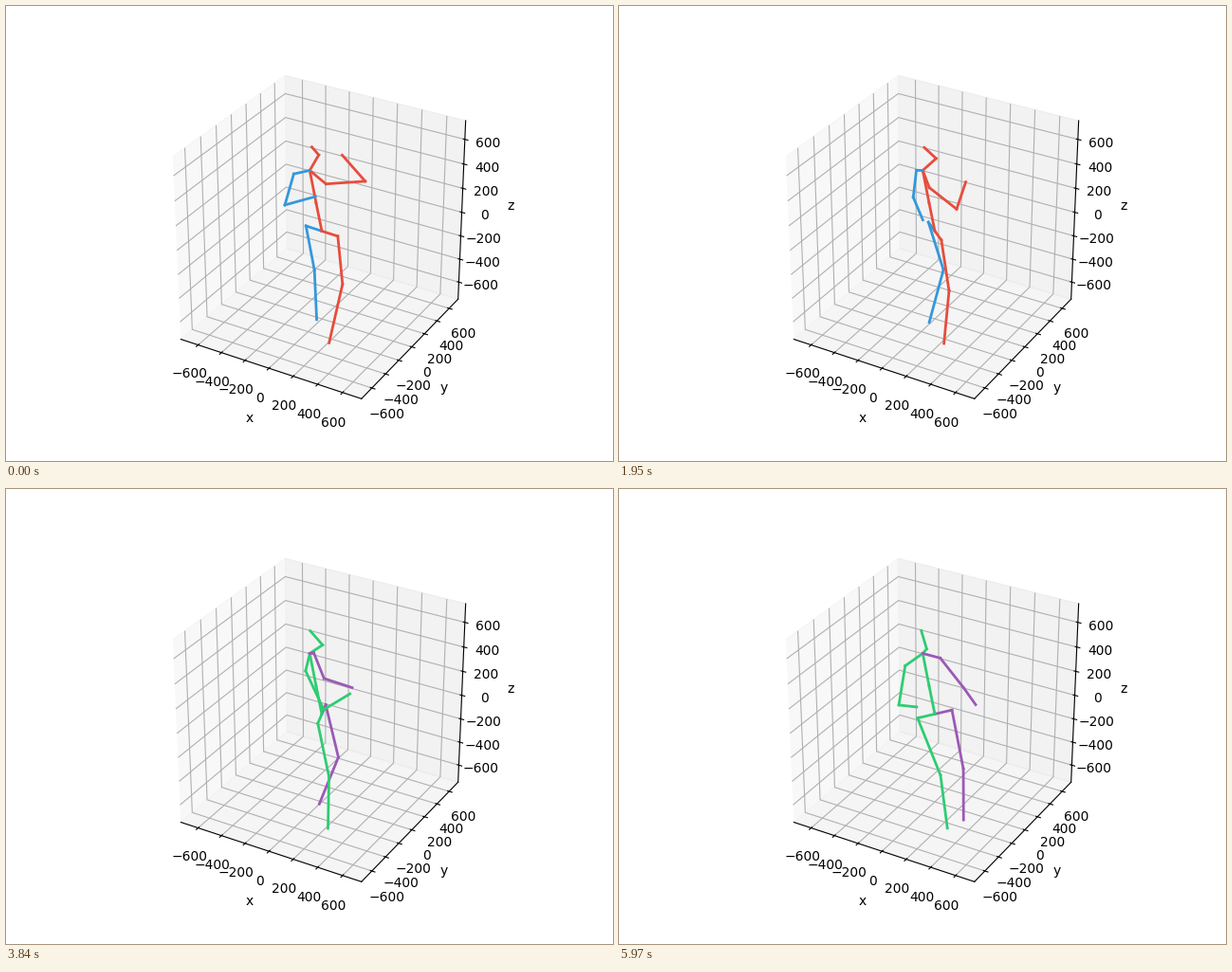
These frames come from a looping animation (640 by 480 pixels, 6000 ms). A matplotlib script:

```python
import numpy as np
import matplotlib.pyplot as plt
from matplotlib.animation import FuncAnimation

FRAMES, SWITCH = 200, 100
RADIUS = 750
UNIT = 6.824  # data units per screen pixel at the root
THIGH, SHANK = 65, 66

# World directions as the viewer sees them.
RIGHT = np.array([0.866, 0.5, 0.0])
TOWARD = np.array([0.5, -0.866, 0.0])
UP = np.array([0.0, 0.0, 1.0])

# Left and right colours of the recorded and the predicted walk.
RECORDED = "#3498db", "#e74c3c"
PREDICTED = "#9b59b6", "#2ecc71"

# Arm segments as (forward, side, up) in the walker's frame.
ARM_POSES = {
    "r": dict(raised=[(27, 31, 0), (4, -31, 20)],
              low=[(20, 4.5, -41), (27.5, 0, 22)],
              rest=[(3, 9, -43), (45, 0, 21)]),
    "l": dict(raised=[(2, -13, -42), (33, 17, 0)],
              low=[(5, -28, -45), (34, 17, 2)],
              rest=[(11, -22, -35), (33, 2, -3)]),
}
HANGING = np.array([9, 5, -27])


def ease(x):
    x = np.clip(x, 0, 1)
    return x * x * (3 - 2 * x)


def mix(a, b, k):
    return (1 - k) * np.asarray(a, float) + k * np.asarray(b, float)


def wave(phase):
    return np.cos(2 * np.pi * phase)


def leg(hip, phase, side, settle):
    """Knee and foot of one leg; the stride fades as the walk settles."""
    stride = 1 - 0.9 * settle
    knee = 13 + 15 * stride * wave(phase - 0.15) + settle * (12 + 3 * side)
    foot = 2 + 37 * stride * wave(phase - 0.2) + settle * (25 + 8 * side)
    shift = -settle * (12 + 8 * side)
    knee_up = -np.sqrt(THIGH**2 - knee**2)
    foot_up = knee_up - np.sqrt(SHANK**2 - (foot - knee)**2)
    return (hip + [knee, 0.7 * shift, knee_up],
            hip + [foot, shift, foot_up])


def pose(i):
    """Joint positions in data units."""
    predicted = i >= SWITCH
    t = i - SWITCH if predicted else i
    phase = 0.367 + t / (51.5 if predicted else 41.2)
    if predicted:
        raised = 1 - ease(t / 28)
        settle, drop = ease((t - 28) / 45), 0
    else:
        raised = 0.5 + 0.5 * wave(t / 52)
        settle, drop = 0, ease((t - 28) / 37)

    yaw = np.radians(np.interp(i, [0, 100, 128, 175, 199],
                               [33, 90, 102, 140, 155]))
    side = np.cos(yaw) * RIGHT + np.sin(yaw) * TOWARD
    forward = np.sin(yaw) * RIGHT - np.cos(yaw) * TOWARD
    frame = np.array([forward, side, UP])

    # The torso leans to the viewer's left whatever the heading.
    lean = frame @ RIGHT
    p = {"root": np.zeros(3)}
    p["spine"] = -6 * lean + [0, 0, 34]
    p["chest"] = -12.5 * lean + [0, 0, 72.5]
    p["neck"] = p["chest"] + [14, 2, 12.5]
    p["head"] = p["neck"] + [-13, 0, 15]

    for name, sign in (("l", -1), ("r", 1)):
        hip = np.array([0, 20 * sign, 0])
        leg_phase = phase + (0.5 if sign > 0 else 0)
        p["hip_" + name] = hip
        p["knee_" + name], p["foot_" + name] = leg(hip, leg_phase, sign, settle)

        arm = ARM_POSES[name]
        upper, fore = mix(mix(arm["low"], arm["raised"], raised),
                          arm["rest"], settle)
        if name == "l":
            fore = mix(fore, HANGING, drop)
        p["shoulder_" + name] = p["chest"] + [0, 20 * sign, -10]
        p["elbow_" + name] = p["shoulder_" + name] + upper
        p["wrist_" + name] = p["elbow_" + name] + fore

    return {joint: UNIT * (xyz @ frame) for joint, xyz in p.items()}


CHAINS = [
    ("root hip_l knee_l foot_l", True),
    ("root hip_r knee_r foot_r", False),
    ("root spine chest neck head", False),
    ("chest shoulder_r elbow_r wrist_r", False),
    ("chest shoulder_l elbow_l wrist_l", True),
]

BONES = []
for chain, left in CHAINS:
    names = chain.split()
    BONES += [(a, b, left) for a, b in zip(names, names[1:])]

fig = plt.figure(figsize=(6.4, 4.8), dpi=100)
ax = fig.add_subplot(projection="3d")
ax.set_box_aspect((1, 1, 1))
limits = (-RADIUS, RADIUS)
ax.set(xlim=limits, ylim=limits, zlim=limits,
       xlabel="x", ylabel="y", zlabel="z")
lines = [ax.plot([0, 0], [0, 0], [0, 0], lw=2)[0] for _ in BONES]


def draw(i):
    left_color, right_color = RECORDED if i < SWITCH else PREDICTED
    joints = pose(i)
    for line, (a, b, left) in zip(lines, BONES):
        line.set_data_3d(*np.array([joints[a], joints[b]]).T)
        line.set_color(left_color if left else right_color)
    return lines


anim = FuncAnimation(fig, draw, frames=FRAMES, interval=30,
                     repeat=True, repeat_delay=0, blit=False)
plt.show()
```
